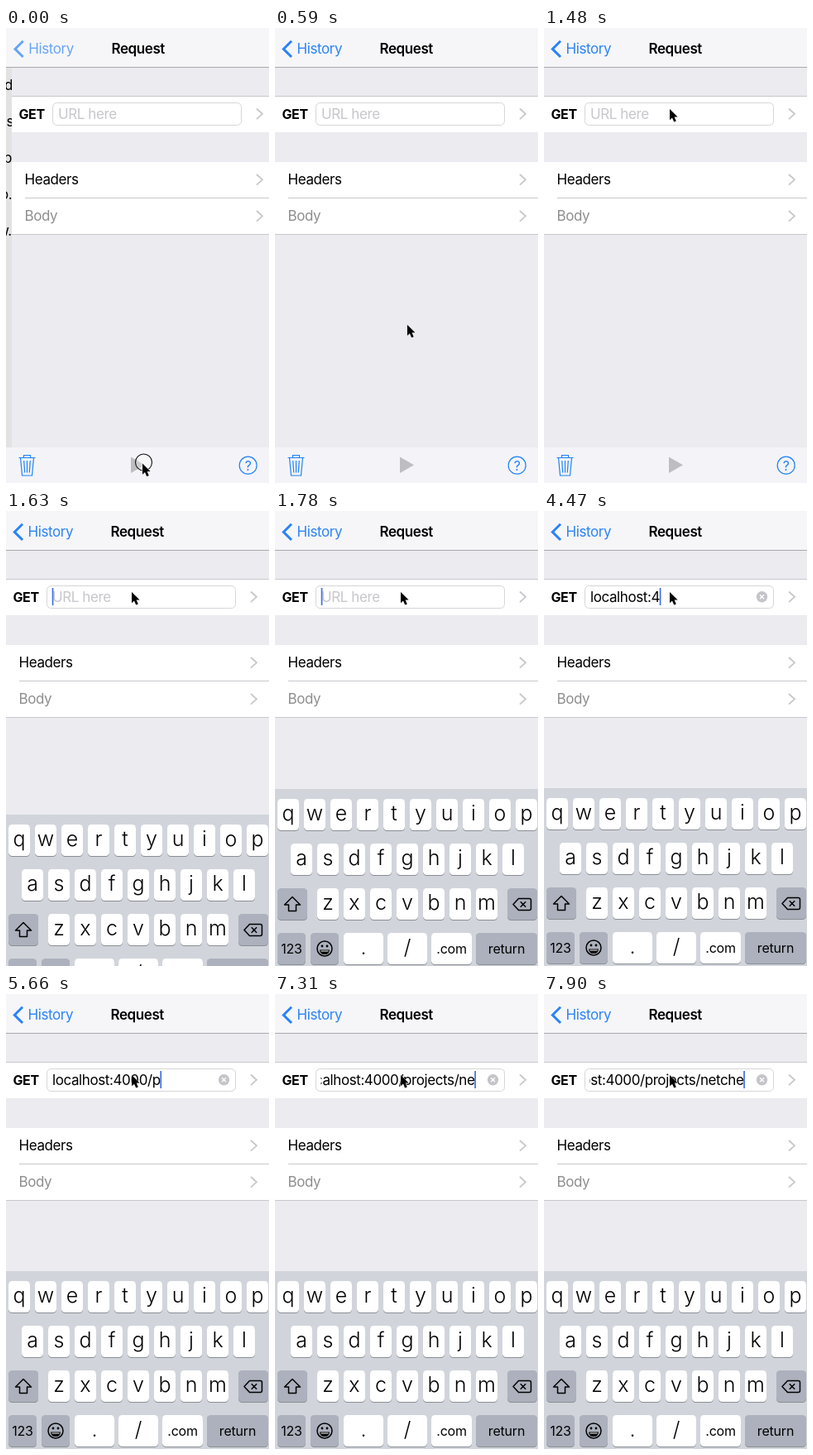
These frames come from a looping animation (318 px wide and 550 px high, 8 s). An HTML page:

```html
<!DOCTYPE html>
<html lang="en">
<head>
<meta charset="utf-8">
<title>Request</title>
<style>
  html, body { margin: 0; width: 100%; height: 100%; overflow: hidden; background: #ebebf0; }
  svg { display: block; width: 318px; height: 550px; font: 17px Inter, Roboto, sans-serif; letter-spacing: -.41px; }
  .title { font-weight: 600; }
  .method { font-size: 16px; font-weight: 700; }
  .line { stroke: #c8c7cc; }
  .chevron { fill: none; stroke: #c7c7cc; stroke-width: 1.8; }
  .blue { fill: none; stroke: #1f82f5; stroke-width: 1.2; }
  .icon { fill: none; stroke: #000; stroke-width: 1.5; stroke-linejoin: round; }
  .key { font-size: 25px; font-weight: 300; letter-spacing: 0; text-anchor: middle; }
  .label { font-size: 16px; letter-spacing: -.2px; text-anchor: middle; }
</style>
</head>
<body>
<svg viewBox="0 0 318 550">
  <defs>
    <clipPath id="fieldClip"><rect x="55.5" y="88" width="187.5" height="32"/></clipPath>
    <clipPath id="stripClip"><rect y="48" width="7" height="459"/></clipPath>
    <path id="next" class="chevron" d="M296 97.5l7 6.3l-7 6.3"/>
  </defs>

  <rect width="318" height="550" fill="#ebebf0"/>

  <g id="page">
    <rect y="82" width="318" height="44" fill="#fff"/>
    <rect y="162" width="318" height="88" fill="#fff"/>
    <path class="line" d="M0 82.5H318M16 205.5H318M0 249.5H318"/>
    <text class="method" x="8.5" y="109.5">GET</text>
    <rect x="49.5" y="90.5" width="228" height="27" rx="5" fill="#fff" stroke="#d6d6d8"/>
    <text id="hint" x="56" y="109.5" fill="#c7c7cc">URL here</text>
    <g clip-path="url(#fieldClip)"><text id="typed" y="109.5"></text></g>
    <rect id="caret" y="93" width="1.7" height="21" fill="#3f6fe0"/>
    <g id="clear">
      <circle cx="263.5" cy="103.7" r="6.7" fill="#c4c4c9"/>
      <path d="M261 101.2l5 5m0-5l-5 5" stroke="#fff" stroke-width="1.3"/>
    </g>
    <text x="15.5" y="189">Headers</text>
    <text x="15.5" y="233" fill="#8e8e8f">Body</text>
    <use href="#next"/><use href="#next" y="79.5"/><use href="#next" y="123.5"/>
  </g>

  <g id="strip" clip-path="url(#stripClip)">
    <rect y="48" width="7" height="459" fill="#e2e2e3"/>
  </g>

  <rect width="318" height="47" fill="#f6f6f9"/>
  <path d="M0 47.5H318" stroke="#a9a9ad"/>
  <g id="back">
    <path d="M20 15.8L10.3 25.4L20 35" fill="none" stroke="#2a84f7" stroke-width="3"/>
    <text x="26.5" y="31" fill="#2a84f7">History</text>
  </g>
  <text id="title" class="title" y="31">Request</text>

  <rect y="507" width="318" height="43" fill="#f4f4f8"/>
  <g class="blue">
    <path d="M15.5 519.5H35.5M21.5 519.5V516.5H29.5V519.5M17.5 519.5L19.5 541H31.5L33.5 519.5M21.7 523L22.7 537.5M25.5 523V537.5M29.3 523L28.3 537.5"/>
    <circle cx="292.7" cy="528.7" r="10.5"/>
  </g>
  <text class="label" x="292.7" y="534.5" fill="#1f82f5">?</text>
  <path d="M151 518.5L168 528.3L151 538Z" fill="#bdbdc2"/>

  <g id="keyboard">
    <rect y="335" width="318" height="216" fill="#d1d5db"/>
    <g id="keys"></g>
    <path class="icon" d="M21 465.5L30.5 475H25.5V482.5H16.5V475H11.5Z"/>
    <path class="icon" d="M294.5 467.5H307.5Q309.5 467.5 309.5 469.5V479.5Q309.5 481.5 307.5 481.5H294.5L288 474.5ZM296.8 471.3l6.4 6.4m0-6.4l-6.4 6.4"/>
    <circle class="icon" cx="60" cy="528" r="9"/>
    <path d="M54 529.5H66Q65.5 535 60 535T54 529.5Z"/>
    <path d="M55.5 531H64.5" stroke="#fff"/>
    <circle cx="57" cy="525" r="1.4"/><circle cx="63" cy="525" r="1.4"/>
  </g>

  <g id="cursor">
    <circle id="tap" cx="1.5" cy="-1.5" r="10" fill="#fff" fill-opacity=".25" stroke="#111" stroke-width="1.1"/>
    <path d="M0 0V13.2L3 10.5L5.2 15.6L7.8 14.5L5.6 9.6H9.6Z" fill="#000" stroke="#fff" stroke-width="1" paint-order="stroke"/>
  </g>
</svg>
<script>
const NS = 'http://www.w3.org/2000/svg';
const LOOP = 8000, URL_TEXT = 'localhost:4000/projects/netche';
const TEXT_X = 56, CARET_MAX = 241.5;
// One keystroke time per character of URL_TEXT.
const STROKES = [2070, 2370, 2670, 2820, 2970, 3270, 3420, 3570, 3870, 4170,
  4470, 4610, 4910, 5210, 5510, 5660, 5810, 5960, 6110, 6260,
  6410, 6710, 6710, 6860, 7010, 7310, 7460, 7610, 7760, 7900];
const MOVES = [0, 150, 300, 450, 590, 740, 890, 1030, 1180];
const KEYBOARD = [[0, 216], [1630, 32], [1780, 1], [1930, 0]];

const $ = id => document.getElementById(id);
const [page, strip, back, title, hint, typed, caret, clear, keyboard, keys, cursor, tap] =
  ['page', 'strip', 'back', 'title', 'hint', 'typed', 'caret', 'clear', 'keyboard', 'keys', 'cursor', 'tap'].map($);

function add(parent, tag, attrs, text = '') {
  const el = document.createElementNS(NS, tag);
  for (const k in attrs) el.setAttribute(k, attrs[k]);
  el.textContent = text;
  return parent.appendChild(el);
}

function addKey(x, y, w, text, fill = '#fff', label = false) {
  add(keys, 'rect', { x, y: y + 1, width: w, height: 38, rx: 4.5, fill: '#8a8d93' });
  add(keys, 'rect', { x, y, width: w, height: 38, rx: 4.5, fill });
  add(keys, 'text', { x: x + w / 2, y: y + (label ? 24.5 : 26), class: label ? 'label' : 'key' }, text);
}

const GREY = '#acb1bd';
[['qwertyuiop', 3], ['asdfghjkl', 19], ['zxcvbnm', 51]].forEach(([row, x], r) =>
  [...row].forEach((c, i) => addKey(x + i * 32, 347 + r * 54, 26, c)));
addKey(3, 455, 36, '', GREY);
addKey(281, 455, 36, '', GREY);
addKey(3, 509, 34, '123', GREY, true);
addKey(43, 509, 34, '', GREY);
addKey(83, 509, 48, '.');
addKey(136, 509, 48, '/');
addKey(189, 509, 49, '.com', '#fff', true);
addKey(243, 509, 74, 'return', GREY, true);

['d', 'es', 'p', 'o.j', 'w.g'].forEach((s, i) =>
  add(strip, 'text', { x: [-2, -9, -3, -7, -10][i], y: 75 + i * 44 }, s));

const show = (el, on) => el.setAttribute('visibility', on ? 'visible' : 'hidden');
const shift = (el, x, y) => el.setAttribute('transform', `translate(${x} ${y})`);
const ease = p => p * p * (3 - 2 * p);

function draw(t) {
  const sliding = t < 150;
  shift(page, sliding ? 7 : 0, 0);
  show(strip, sliding);
  back.setAttribute('opacity', sliding ? .7 : 1);
  shift(back, sliding ? .7 : 0, 0);
  title.setAttribute('x', sliding ? 127.5 : 126.5);

  const step = MOVES.filter(m => m <= t).pop();
  const p = ease(Math.max(0, step - 150) / 1030);
  shift(cursor, 165 - 13 * p, 526.5 - 428.5 * p);
  show(tap, sliding || (t >= 1330 && t < 1480));

  shift(keyboard, 0, KEYBOARD.filter(k => k[0] <= t).pop()[1]);

  const count = STROKES.filter(s => s <= t).length;
  const text = URL_TEXT.slice(0, count);
  if (typed.textContent !== text) typed.textContent = text;
  const width = count ? typed.getComputedTextLength() : 0;
  const end = Math.min(TEXT_X + width, CARET_MAX);
  typed.setAttribute('x', end - width);
  caret.setAttribute('x', end - .3);
  show(caret, t >= 1630);
  show(hint, !count);
  show(clear, count);
}

const start = performance.now();
function frame() {
  draw((performance.now() - start) % LOOP);
  requestAnimationFrame(frame);
}
frame();
</script>
</body>
</html>
```
